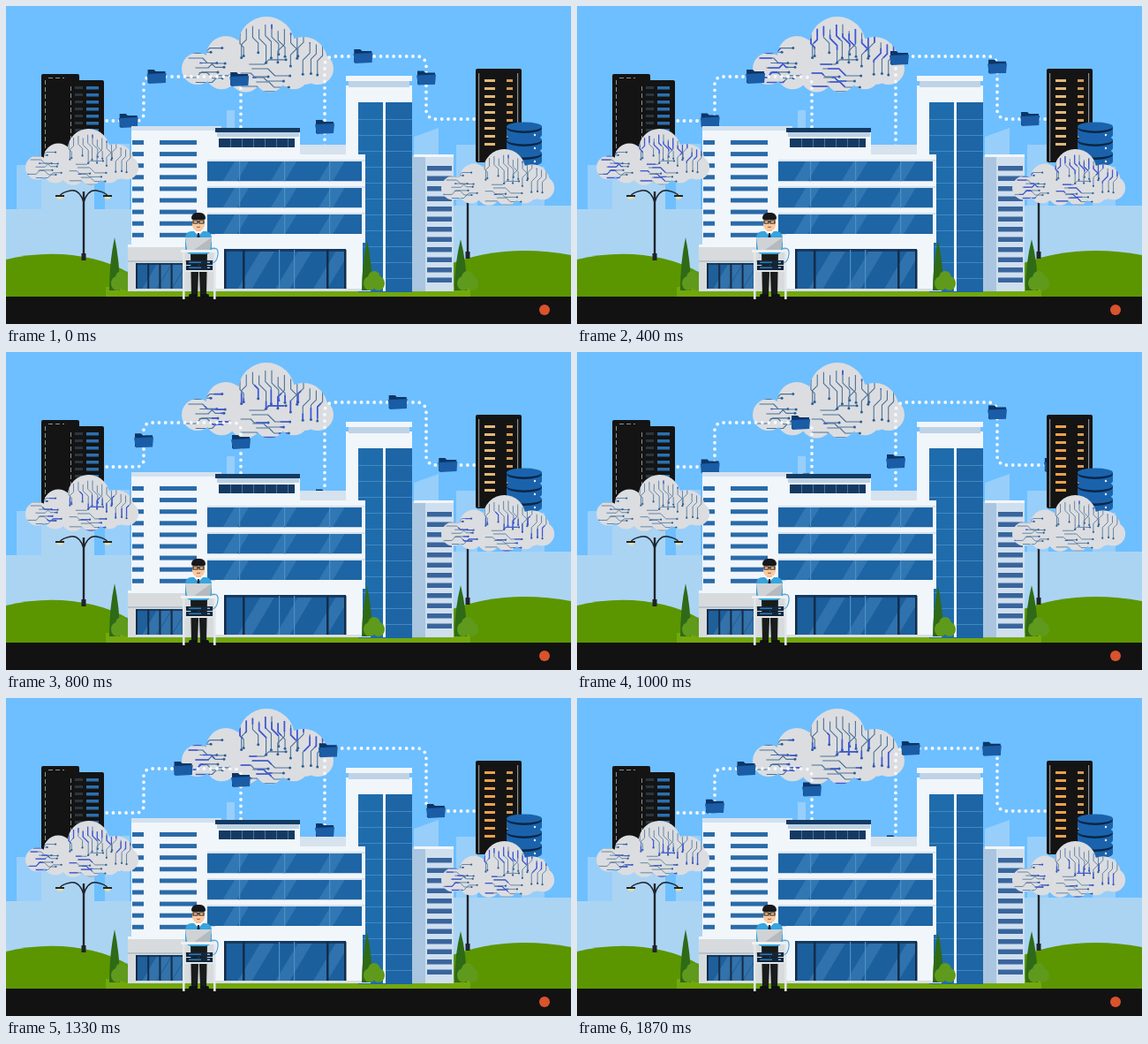
An HTML page with a canvas that plays this animation: 640 by 360 pixels, repeating every 1.94 s.

```html
<!DOCTYPE html>
<html lang="en">
<head>
<meta charset="utf-8">
<title>City cloud network</title>
<style>
html, body { margin: 0; width: 100%; height: 100%; overflow: hidden; background: #111; }
canvas { display: block; width: 640px; height: 360px; }
</style>
</head>
<body>
<canvas id="stage" width="640" height="360"></canvas>
<script>
const LOOP = 1940, TAU = Math.PI * 2;
const c = document.getElementById('stage').getContext('2d');

function box(color, x, y, w, h) {
  c.fillStyle = color;
  c.fillRect(x, y, w, h);
}
function rows(color, x, y, w, h, n, step) {
  for (let i = 0; i < n; i++) box(color, x, y + i * step, w, h);
}
function columns(color, x, y, w, h, n, step) {
  for (let i = 0; i < n; i++) box(color, x + i * step, y, w, h);
}
function fill(color, d) {
  c.fillStyle = color;
  c.fill(new Path2D(d));
}
function stroke(color, width, d) {
  c.strokeStyle = color;
  c.lineWidth = width;
  c.stroke(new Path2D(d));
}
function oval(color, x, y, rx, ry = rx) {
  c.fillStyle = color;
  c.beginPath();
  c.ellipse(x, y, rx, ry, 0, 0, TAU);
  c.fill();
}
function round(color, x, y, w, h, r) {
  c.fillStyle = color;
  c.beginPath();
  c.roundRect(x, y, w, h, r);
  c.fill();
}

// Three folders per route follow each other and repeat every CYCLE steps
const CYCLE = 30;
function route(d, speed, starts) {
  const track = document.createElementNS('http://www.w3.org/2000/svg', 'path');
  track.setAttribute('d', d);
  return { track, speed, starts, line: new Path2D(d), length: track.getTotalLength() };
}
const routes = [
  route('M266 480V88A8 8 0 0 0 258 80H164A8 8 0 0 0 156 88V122A8 8 0 0 1 148 130H70', 10.5, [252, 397.5, 492]),
  route('M361 560V67A10 10 0 0 1 371 57H466A10 10 0 0 1 476 67V118A10 10 0 0 0 486 128H555', 13.2, [238, 423, 542])
];

function folder(x, y) {
  c.save();
  c.translate(x, y);
  fill('#0b3567', 'M-10 -8H-3L-1 -6H10V7H-10Z');
  fill('#1a5ca5', 'M-11 -3L11 -4L10 7L-9 8Z');
  c.restore();
}
function drawRoutes(k) {
  c.save();
  c.strokeStyle = '#f4f9ff';
  c.lineWidth = 3.8;
  c.lineCap = 'round';
  c.setLineDash([0, 7.3]);
  for (const r of routes) c.stroke(r.line);
  c.restore();
  for (const r of routes) {
    const period = r.speed * CYCLE;
    for (const s of r.starts) {
      for (let d = (s + r.speed * k) % period; d < r.length; d += period) {
        const p = r.track.getPointAtLength(d);
        folder(p.x, p.y);
      }
    }
  }
}

let seed = 11;
function rnd(min, max) {
  seed = (seed * 16807) % 2147483647;
  return min + (max - min) * seed / 2147483647;
}

// A row of small lobes along the base, three big ones above
const cloud = new Path2D();
function lobe(x, y, r) {
  cloud.moveTo(x + r, y);
  cloud.arc(x, y, r, 0, TAU);
}
for (let i = 0; i < 6; i++) lobe(18 + i * 27.2, 59 + 9 * Math.sin(Math.PI * i / 5), 18);
lobe(96, 32, 32);
lobe(50, 44, 22);
lobe(138, 50, 27);

// Circuit line: straight, diagonal jog, straight
function trace(x, y, upright) {
  const a = rnd(9, 19), b = rnd(9, 20), e = rnd(4, 8), d = rnd(-1, 1) < 0 ? -e : e;
  const pts = [[0, 0], [a, 0], [a + e, d], [a + e + b, d]]
    .map(([u, v]) => upright ? [x + v, y + u] : [x + u, y + v]);
  const line = new Path2D();
  for (const p of pts) line.lineTo(...p);
  return { line, end: pts[3], length: a + b + e * Math.SQRT2 };
}
const traces = [];
for (let i = 0; i < 8; i++) traces.push(trace(rnd(3, 24), 36 + i * 5.5, false));
for (let i = 0; i < 6; i++) traces.push(trace(rnd(52, 86), 54 + i * 5, false));
for (let i = 0; i < 14; i++) {
  const x = 66 + i * 7.2;
  traces.push(trace(x, rnd(4, 12) + Math.abs(x - 96) * 0.38, true));
}

function drawCloud(x, y, scale, k) {
  const q = k % 15 / 15;
  c.save();
  c.translate(x, y);
  c.scale(scale, scale);
  c.fillStyle = '#dcdde0';
  c.fill(cloud);
  c.clip(cloud);
  c.lineJoin = 'round';
  traces.forEach((t, i) => {
    c.strokeStyle = '#4a7299';
    c.lineWidth = 1.1;
    c.stroke(t.line);
    oval('#2d5f94', ...t.end, 1.5);
    const lag = i * 0.37 % 1 * 0.5;
    const from = Math.max(0, q * 1.6 - 0.35 - lag);
    const to = Math.min(1, q * 1.6 + 0.15 - lag);
    if (to <= from) return;
    c.setLineDash([0, from * t.length, (to - from) * t.length, 999]);
    c.strokeStyle = '#4058d4';
    c.lineWidth = 1.7;
    c.stroke(t.line);
    c.setLineDash([]);
  });
  c.restore();
}

function drawSky() {
  const far = '#98cefa', near = '#abd4f3';
  box('#6dbfff', 0, 0, 640, 360);
  box(far, 12, 180, 30, 120);
  box(far, 112, 156, 28, 140);
  box(far, 250, 118, 9, 30);
  fill(far, 'M462 148L490 138V300H462Z');
  box(far, 510, 157, 24, 140);
  box(far, 584, 182, 26, 110);
  box(near, 0, 230, 142, 70);
  box(near, 40, 196, 60, 90);
  box(near, 500, 226, 140, 70);
}

function drawTowers(k) {
  round('#141414', 40, 77, 43, 100, 2);
  round('#141414', 68, 84, 43, 90, 2);
  c.save();
  c.setLineDash([5, 3]);
  stroke('#8c9094', 1, 'M44.5 84V166M73.5 91V166M48 81.5H66');
  c.restore();
  rows('#2c70b0', 91, 91, 14, 3.5, 9, 8);
  rows('#2a3640', 78, 91, 9, 3, 9, 8);

  const warm = k > 14;
  round('#141414', 532, 71, 52, 106, 2);
  box('#8b8d90', 535, 76, 1.2, 100);
  box('#8b8d90', 579, 76, 1.2, 100);
  rows(warm ? '#f0a04c' : '#e3b878', 542, 83, 12, 3, 9, 9);
  rows('#d59a56', 567, 83, 7, 3, 9, 9);

  for (let y = 168; y > 130; y -= 15) {
    box('#1a63ac', 567, y, 40, 8);
    oval('#1a63ac', 587, y + 8, 20, 6);
    oval('#0c2545', 587, y, 20, 6);
    oval('#1a63ac', 587, y - 1.5, 20, 5);
    oval('#e8f2fb', 599, y + 8, 1.2);
  }
}

function drawLand() {
  fill('#5b9600', 'M0 287Q50 275 98 286Q124 292 142 304V331H0Z');
  fill('#5b9600', 'M500 293Q565 268 640 282V331H500Z');
  box('#72a80c', 113, 318, 413, 12);
  box('#121212', 0, 329, 640, 31);
}

function lamp(x, y, foot) {
  stroke('#20242a', 2.4, `M${x} ${y - 2}V${foot}`);
  for (const s of [-1, 1]) {
    stroke('#20242a', 1.6, `M${x} ${y + 10}Q${x + s * 5} ${y - 5} ${x + s * 15} ${y - 3}T${x + s * 27} ${y + 3}`);
    oval('#f3df9c', x + s * 27, y + 5, 3.5, 1.5);
    box('#20242a', x + s * 27 - 5, y + 2, 10, 2);
  }
  box('#20242a', x - 2.5, foot - 8, 5, 8);
}

function bush(x, y, w) {
  fill('#2f6a17', `M${x} ${y}Q${x + w} ${y + 28} ${x + w} 322H${x - w}Q${x - w} ${y + 28} ${x} ${y}Z`);
  for (let i = 0; i < 3; i++) oval('#5f9a1c', x + 3 + i * 5, 314 - i % 2 * 6, 7, 8);
}

function glass(x, y, w, h, color) {
  c.save();
  c.beginPath();
  c.rect(x, y, w, h);
  c.clip();
  box(color, x, y, w, h);
  for (let i = 0; i < 3; i++) {
    const a = x + w * (0.1 + i * 0.31);
    fill('rgba(130,190,235,.2)', `M${a + h * 0.6} ${y}h16L${a + 16} ${y + h}h-16Z`);
  }
  c.restore();
}

function drawBuilding() {
  const white = '#f1f6fb', shade = '#d6e2ed', blue = '#1d65a5', navy = '#153a62';

  box(white, 142, 136, 102, 140);
  box('#d3e1ee', 142, 136, 102, 5);
  rows('#2a6ba9', 143, 152, 13, 5, 9, 13.1);
  rows('#2a6ba9', 174, 152, 42, 5, 9, 13.1);

  box('#cfdfee', 459, 169, 48, 154);
  box('#a9c5e0', 459, 169, 16, 154);
  box(white, 462, 168, 45, 3);
  rows('#3a659d', 477, 181, 28, 5.5, 12, 11.5);

  box('#d6e2ed', 332, 157, 54, 12);

  box(blue, 399, 106, 61, 218);
  box('#1f6cad', 399, 106, 28, 218);
  rows('#4188bf', 399, 128, 61, 1, 11, 18);
  box(white, 427, 108, 3, 215);
  box(white, 385, 90, 75, 19);
  box('#bed3e6', 388, 84, 69, 8);
  box(white, 385, 79, 75, 6);
  box(white, 385, 106, 14, 62);

  box(white, 238, 140, 95, 28);
  box(navy, 237, 138, 96, 5);
  box('#bcd2e5', 239, 143, 93, 5);
  box(navy, 241, 150, 86, 10);
  columns('#4473a0', 254, 150, 1, 10, 6, 13);

  box(white, 228, 168, 179, 100);
  for (let y = 176; y < 240; y += 30) {
    glass(228, y, 175, 22.5, blue);
    columns('#4a90c6', 264, y, 1.2, 22.5, 3, 51);
    box(shade, 228, y - 2, 179, 2);
  }

  box(white, 237, 258, 167, 65);
  glass(247, 276, 138, 47, '#1c5f9d');
  box(navy, 247, 275, 138, 3);
  for (const x of [247, 268, 363, 383]) box('#142c48', x, 276, 2.5, 47);
  columns('#4a90c6', 309, 276, 1.2, 47, 2, 17);

  box('#d7dbde', 138, 270, 99, 53);
  box(white, 138, 270, 99, 3);
  box('#b9c2c9', 138, 288, 99, 2);
  glass(147, 291, 55, 32, '#1f5f9a');
  box(navy, 147, 291, 55, 2);
  columns('#142c48', 147, 291, 2, 32, 5, 13.2);
  box('#d6dde4', 138, 320, 275, 3);
}

function drawWorker() {
  fill('#191c1a', 'M209 279H228L227 328H220L218.5 290L217 328H210Z');
  round('#101114', 207, 326, 10, 4, 2);
  round('#101114', 220, 326, 10, 4, 2);
  round('#36a4de', 203, 255, 30, 26, 7);
  box('#efbb91', 215, 249, 6, 8);
  fill('#fff', 'M213 255H223L218 260Z');
  fill('#15243a', 'M217 257H219L220 267L218 269L216 267Z');
  round('#f8c99f', 211, 237, 14, 17, 6);
  round('#16181c', 210, 234, 16, 8, [6, 6, 2, 2]);
  stroke('#25201d', 1.1, 'M212 243H217V246H212ZM219 243H224V246H219ZM217 244H219');
  stroke('#a4513a', 1, 'M216 250Q218 251 220 250');

  fill('#cfd3d6', 'M203 262H233L231 276H205Z');
  fill('#b4babf', 'M233 262L231 276H213Z');
  box('#eef0f1', 198, 276, 42, 3);
  columns('#e3e6e8', 200, 279, 2.6, 53, 2, 35);
  box('#e3e6e8', 202, 299, 34, 2);
  rows('#14263b', 204, 288, 30, 5, 2, 6);
  rows('#2c7ab6', 207, 289.5, 14, 1.5, 2, 6);
  rows('#8bb9da', 228, 289.5, 3, 1.5, 2, 6);
  stroke('#4aa0dc', 1.2, 'M232 275Q241 272 240 281T234 291');
}

function draw(t) {
  // 15 steps a second, each starting on a whole 10 ms
  let k = Math.floor(t * 0.015 + 0.05);
  if (Math.round(k * 20 / 3) * 10 > t) k--;
  k = Math.max(0, Math.min(28, k));

  drawSky();
  drawCloud(199, 12, 1, k);
  drawRoutes(k);
  drawTowers(k);
  drawLand();
  lamp(88, 212, 288);
  lamp(523, 212, 286);
  bush(123, 262, 6);
  bush(515, 264, 7);
  drawBuilding();
  bush(409, 265, 6);
  drawCloud(22, 139, 0.745, k);
  drawCloud(493, 162, 0.745, k);
  drawWorker();
  oval('#d9532c', 610, 344, 6);
}

function tick() {
  draw(performance.now() % LOOP);
  requestAnimationFrame(tick);
}
tick();
</script>
</body>
</html>
```
